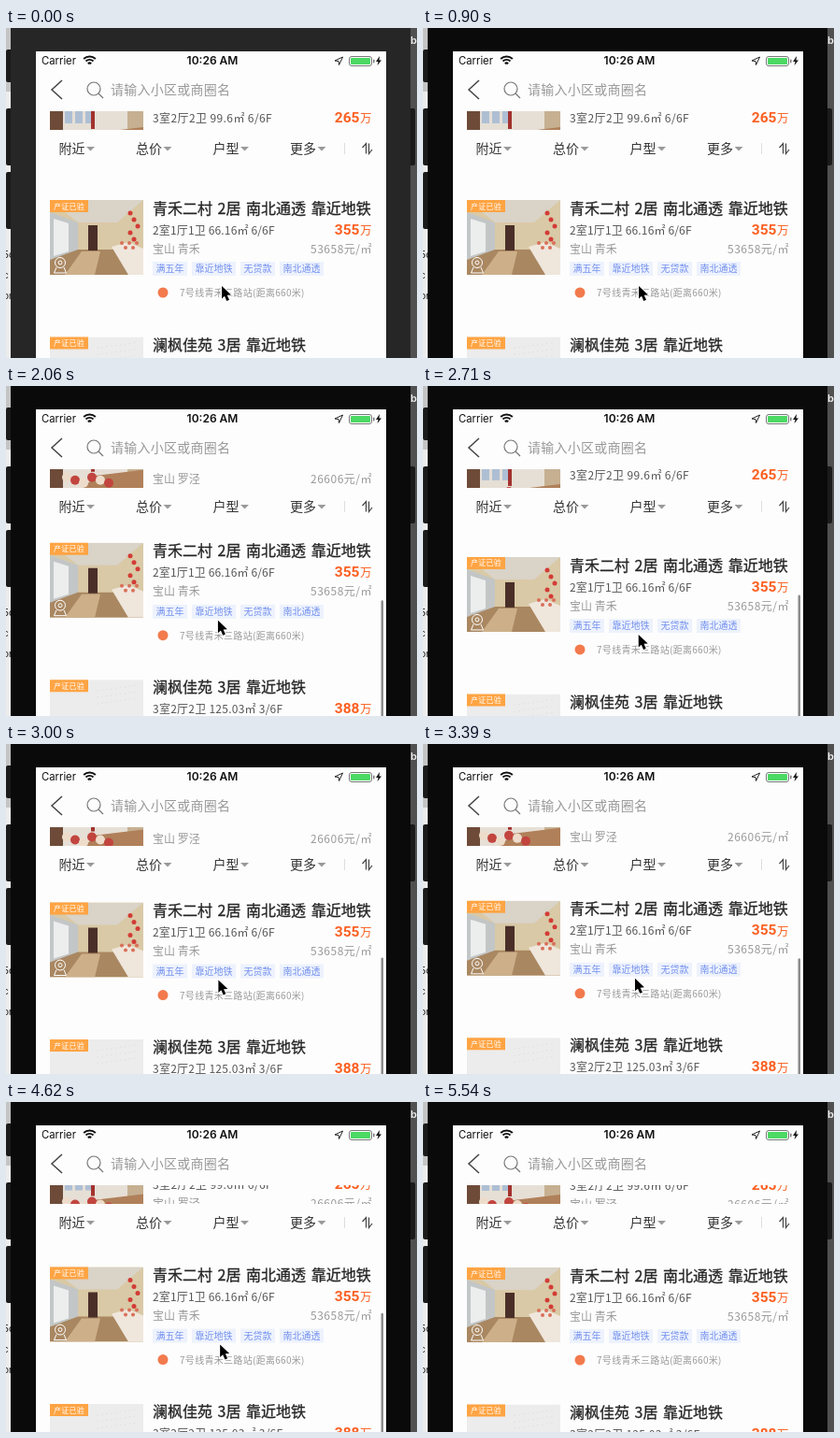
Recreate the animation shown at these times as an HTML page with a canvas. Size 440 by 353 pixels, loop 6070 ms.

```html
<!DOCTYPE html>
<html lang="zh">
<head>
<meta charset="utf-8">
<style>
html, body { margin: 0; width: 100%; height: 100%; overflow: hidden; background: #0a0a0a; }
canvas { display: block; }
</style>
</head>
<body>
<canvas id="stage" width="440" height="353"></canvas>
<script>
const g = document.getElementById('stage').getContext('2d');
const LOOP = 6070, FOCUS = 900, DRAG = 1290;
const CJK = '"Noto Sans CJK SC", "Noto Sans CJK", sans-serif';
const UI = 'Inter, "Liberation Sans", sans-serif';
const PAPER = '#fdfdfd', INK = '#111';

// each drag: start, end, resting offset
const DRAGS = [
  [DRAG, 1850, -27], [1910, 2560, -1], [2710, 3270, -18.5],
  [3360, 3860, 1], [3980, 4200, -14], [4350, 4710, -7]
];

const ramp = (t, a, b) => Math.max(0, Math.min(1, (t - a) / (b - a)));
const ease = (t, a, b) => 1 - (1 - ramp(t, a, b)) ** 2;
const mix = (a, b, k) => a + (b - a) * k;

const scrollAt = t => DRAGS.reduce((y, [a, b, to]) => mix(y, to, ease(t, a, b)), 0);

// the pointer holds the list after a short drag threshold, then leaves the stage
function pointerAt(t, scroll) {
  const leave = ramp(t, 4880, 5540);
  const y = 275 + scroll - 9 * ramp(t, DRAG, DRAG + 100);
  return [mix(231 + scroll * .25, 384, leave), mix(y, 356, leave)];
}

function rect(c, x, y, w, h, r = 0) {
  g.fillStyle = c;
  g.beginPath();
  g.roundRect(x, y, w, h, r);
  g.fill();
}

function trace(p) {
  g.beginPath();
  for (let i = 0; i < p.length; i += 2) g.lineTo(p[i], p[i + 1]);
}

function poly(c, ...p) {
  trace(p);
  g.fillStyle = c;
  g.fill();
}

function line(c, w, ...p) {
  trace(p);
  g.strokeStyle = c;
  g.lineWidth = w;
  g.stroke();
}

function disc(c, x, y, r) {
  g.fillStyle = c;
  g.beginPath();
  g.arc(x, y, r, 0, 7);
  g.fill();
}

function ring(c, w, x, y, r, from = 0, to = 7) {
  g.strokeStyle = c;
  g.lineWidth = w;
  g.beginPath();
  g.arc(x, y, r, from, to);
  g.stroke();
}

function text(s, x, y, size, color, o = {}) {
  g.font = `${o.weight || 400} ${size}px ${o.font || CJK}`;
  g.letterSpacing = (o.gap || 0) + 'px';
  g.wordSpacing = (o.word || 0) + 'px';
  g.textAlign = o.align || 'left';
  g.fillStyle = color;
  g.fillText(s, x, y);
}

function clip(x, y, w, h, draw) {
  g.save();
  g.beginPath();
  g.rect(x, y, w, h);
  g.clip();
  draw();
  g.restore();
}

function photo(y, paint) {
  clip(47, y, 100, 80, () => {
    g.translate(47, y);
    paint();
  });
}

function hallway() {
  rect('#d9c9a6', 0, 0, 100, 80);
  poly('#d9d3c8', 0, 0, 100, 0, 72, 24, 30, 24);
  poly('#c3c6c6', 0, 13, 30, 24, 30, 55, 0, 66);
  poly('#eceeee', 4, 20, 20, 25, 20, 55, 4, 60);
  poly('#a98761', 0, 64, 30, 53, 74, 53, 100, 80, 0, 80);
  poly('#cdb08a', 34, 55, 54, 55, 48, 80, 16, 80);
  rect('#4a2f28', 41, 27, 10, 27);
  poly('#efe6dc', 66, 50, 84, 45, 100, 52, 100, 80, 84, 80);
  for (let i = 0; i < 5; i++) {
    disc('#d23c36', 86 + 4 * (i % 3), 14 + 7 * i, 2.5);
    disc('#d8705a', 77 + 4 * i, 46 + 5 * (i % 2), 2);
  }
}

function bedroom() {
  rect('#e6dfd6', 0, 0, 100, 80);
  rect('#6e4b38', 0, 16, 14, 48);
  for (let i = 0; i < 3; i++) rect('#aebfd4', 16 + 11 * i, 18, 8, 20);
  rect('#a3322e', 44, 20, 4, 24);
  rect('#c6b091', 83, 16, 17, 64);
  poly('#b0805a', 50, 48, 100, 42, 100, 80, 14, 80);
  for (let i = 0; i < 6; i++) disc(i % 2 ? '#c2453f' : '#eedccb', 18 + 9 * i, 50 + 3 * (i % 3), 5);
}

function placeholder() {
  rect('#ececec', 0, 0, 100, 80);
  g.setLineDash([2, 3]);
  for (let i = 0; i < 3; i++) line('#e2e2e2', 1, 50, 12 + 7 * i, 92, 6 + 7 * i);
  g.setLineDash([]);
}

function badge(y) {
  rect('#ffa443', 47, y, 41, 13);
  text('产证已验', 51, y + 6.5, 8, '#fff', { gap: .25 });
}

// a listing's first lines, placed from the middle of its detail line
function spec(s, cost, y, gap) {
  text(s, 157, y, 12, '#555', { gap });
  text(cost, 378.5, y, 15.5, '#fb6022', { weight: 700, align: 'right', font: 'Roboto, sans-serif' });
  text('万', 379, y, 12.5, '#fb6022');
}

function title(s, y) {
  text(s, 157, y, 16, '#252525', { weight: 500, word: 2 });
  g.strokeStyle = '#252525';
  g.lineWidth = .3;
  g.strokeText(s, 157, y);
}

function place(s, unit, y) {
  text(s, 157, y, 12, '#999');
  text(unit, 326, y, 12, '#999', { gap: .5 });
}

function list() {
  photo(64, bedroom);
  spec('3室2厅2卫 99.6㎡ 6/6F', '265', 96, .4);
  place('宝山 罗泾', '26606元/㎡', 116);

  photo(184, hallway);
  badge(184);
  ring('#fff', 1, 58, 251, 5.5);
  ring('#fff', 1, 58, 251, 2);
  line('#fff', 1, 54, 256, 51.5, 262, 64.5, 262, 62, 256);
  title('青禾二村 2居 南北通透 靠近地铁', 192.5);
  spec('2室1厅1卫 66.16㎡ 6/6F', '355', 216, .15);
  place('宝山 青禾', '53658元/㎡', 236);
  let x = 157;
  for (const tag of ['满五年', '靠近地铁', '无贷款', '南北通透']) {
    const w = tag.length * 10 + 7;
    rect('#edf2fd', x, 250, w, 15);
    text(tag, x + 3.5, 257.5, 10, '#7390ee');
    x += w + 5;
  }
  disc('#f27a4d', 168, 283, 5.5);
  text('7号线青禾三路站(距离660米)', 186, 283.5, 10, '#999', { gap: .3 });

  photo(330.5, placeholder);
  badge(330.5);
  title('澜枫佳苑 3居 靠近地铁', 338.5);
  spec('3室2厅2卫 125.03㎡ 3/6F', '388', 362, .25);
}

function surround(focused) {
  rect('#c4c4c4', 0, 0, 8, 68);
  rect('#ececec', 0, 68, 8, 285);
  rect('#505050', 432, 0, 8, 353);
  text('b', 433, 14, 11, '#eee', { font: UI, weight: 600 });
  ['5c', 'c', 'or'].forEach((s, i) => text(s, -3, 243 + 22 * i, 10, '#222', { font: UI }));
  rect('#1a1a1a', 0, 23, 8, 35, 2);
  for (const [x, y] of [[0, 86], [0, 154], [430, 86]]) rect('#1a1a1a', x, y, 8, 61, 2);
  rect(focused ? '#0a0a0a' : '#262626', 5, 0, 428, 353);
  rect(PAPER, 32, 25, 375, 328);
}

function header() {
  text('Carrier', 38, 35.5, 11.3, INK, { font: UI });
  for (let r = 2.5; r < 10; r += 3.5) ring(INK, 2, 89.5, 40, r, -2.3, -.84);
  text('10:26 AM', 221, 35.5, 12, INK, { font: UI, weight: 600, align: 'center' });
  line('#222', 1, 356, 35.5, 352, 35, 360.5, 31, 356.5, 39.5, 356, 35.5);
  g.strokeStyle = '#777';
  g.beginPath();
  g.roundRect(367.5, 30.5, 24, 10, 2.5);
  g.stroke();
  rect('#4cd964', 369, 32, 21, 7, 1);
  rect('#777', 393, 33.5, 1.5, 4, 1);
  poly(INK, 400, 30, 396, 36, 398.5, 36, 397.5, 40, 402, 34.5, 399.5, 34.5);

  line('#444', 1.5, 60, 56, 49, 66, 60, 76);
  ring('#777', 1.2, 94, 65, 7);
  line('#777', 1.2, 99, 70, 104, 75);
  text('请输入小区或商圈名', 112, 66, 14, '#999', { gap: .25 });
}

function filters() {
  rect(PAPER, 32, 109, 375, 41);
  ['附近', '总价', '户型', '更多'].forEach((s, i) => {
    const x = 56.5 + i * 82.5;
    text(s, x, 129, 14, '#333');
    poly('#999', x + 29.5, 127, x + 38.5, 127, x + 34, 131.5);
  });
  line('#ddd', 1, 362.5, 123, 362.5, 135);
  line('#444', 1.2, 381.5, 128, 385.5, 123.5, 385.5, 134.5);
  line('#444', 1.2, 388.5, 123.5, 388.5, 134.5, 392, 130);
}

function pointer(x, y) {
  g.save();
  g.translate(x, y);
  g.lineJoin = 'round';
  const shape = [0, 1, 0, 14.5, 3, 11.8, 5.3, 17, 8, 15.8, 5.7, 10.8, 10, 10.5];
  line('#fff', 2, ...shape, 0, 1);
  poly('#000', ...shape);
  g.restore();
}

function draw(t) {
  const scroll = scrollAt(t);
  g.textBaseline = 'middle';
  surround(t >= FOCUS);
  header();
  clip(47, 89, 345, 264, () => {
    g.translate(0, scroll);
    list();
  });
  filters();
  if (t >= DRAG) {
    g.globalAlpha = 1 - ramp(t, 4880, 5130);
    rect('#8c8c8c', 401.5, 223 - scroll * .38, 2.5, 200, 1.25);
    g.globalAlpha = 1;
  }
  pointer(...pointerAt(t, scroll));
}

const start = performance.now();
function frame() {
  draw((performance.now() - start) % LOOP);
  requestAnimationFrame(frame);
}
frame();
</script>
</body>
</html>
```
